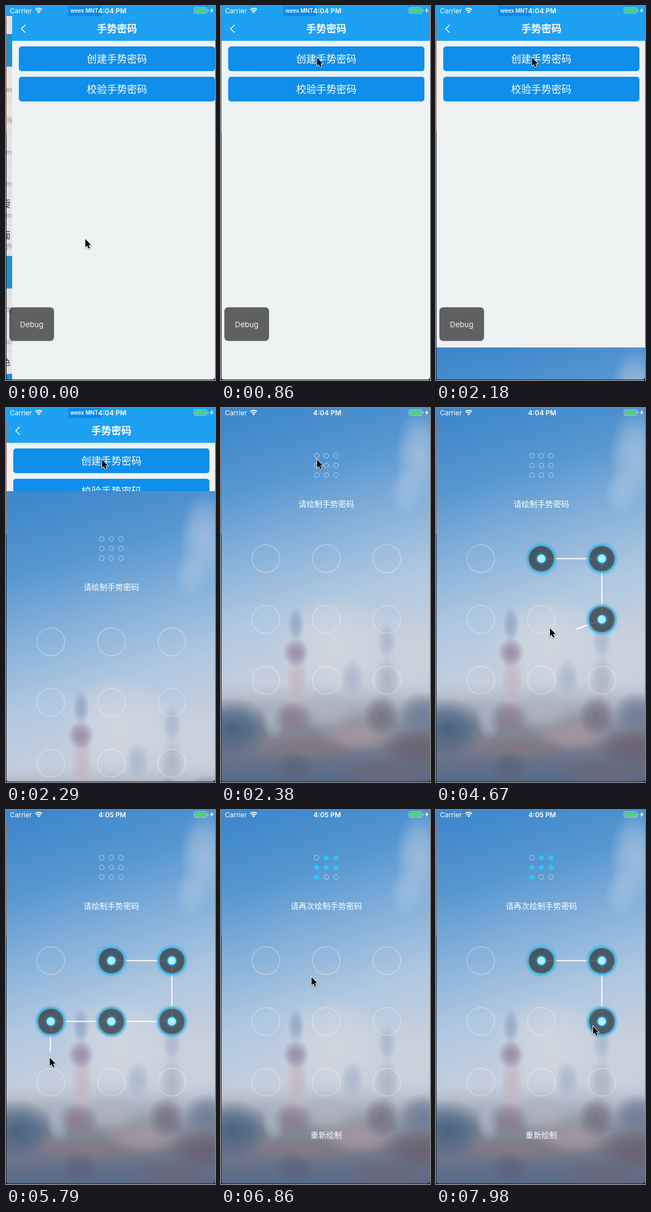
Recreate the animation shown at these times as an HTML page with a canvas. Size 374 px wide and 666 px high, loop 8 s.

```html
<!DOCTYPE html>
<html lang="zh">
<head>
<meta charset="utf-8">
<style>
  html, body { margin: 0; width: 100%; height: 100%; overflow: hidden; background: #000; }
  canvas { display: block; }
</style>
</head>
<body>
<canvas id="stage" width="374" height="666"></canvas>
<script>
const W = 374, H = 666, LOOP = 8000, TOUCH_LAG = 60, HIT_RADIUS = 25;
const FONT = 'Inter, "Noto Sans CJK SC", "Noto Sans CJK", sans-serif';
const ctx = document.getElementById('stage').getContext('2d');

// [time, x, y] of the pointer tip
const pointerKeys = [
  [0, 142, 415], [60, 142, 415], [250, 152, 300], [500, 168, 150], [700, 173, 102], [860, 172, 92],
  [2650, 172, 92], [2800, 171, 160], [2910, 170, 210],
  [3100, 170, 210], [3380, 175, 262],
  [3620, 175, 262], [3800, 215, 265], [4040, 292, 270],
  [4170, 292, 270], [4470, 286, 372], [4610, 252, 394], [4670, 204, 392], [4820, 181, 388],
  [5010, 181, 388], [5450, 83, 382], [5600, 78, 388], [5730, 79, 432], [5850, 78, 450],
  [5910, 80, 468], [6050, 82, 481],
  [6400, 82, 481], [6700, 140, 350], [6970, 177, 262],
  [7270, 177, 262], [7580, 280, 268], [7700, 289, 282], [7920, 286, 379], [7980, 281, 385]
];
const pageKeys = [[0, 10], [60, 10], [180, 0]];
const sheetSteps = [[0, H], [2180, 608], [2230, 340], [2290, 148], [2380, 0]];
const strokes = [[3670, 6350], [7270, LOOP]];
const CONFIRM_AT = 6350, MINUTE_AT = 5450;

const nodes = Array.from({ length: 9 }, (_, i) =>
  [80.2 + (i % 3) * 108.3, 268.3 + Math.floor(i / 3) * 108.2]);

function at(keys, t) {
  const i = keys.findIndex(k => k[0] > t);
  if (i < 0) return keys.at(-1).slice(1);
  const a = keys[i - 1], b = keys[i], f = (t - a[0]) / (b[0] - a[0]);
  return a.slice(1).map((v, n) => v + (b[n + 1] - v) * f);
}

function text(str, x, y, size, color = '#fff', weight = 400, align = 'center') {
  ctx.font = `${weight} ${size}px ${FONT}`;
  ctx.textAlign = align;
  ctx.textBaseline = 'alphabetic';
  ctx.fillStyle = color;
  ctx.fillText(str, x, y);
}

function rect(x, y, w, h, color, radius = 0) {
  ctx.fillStyle = color;
  ctx.beginPath();
  ctx.roundRect(x, y, w, h, radius);
  ctx.fill();
}

function circle(x, y, r, fill, stroke, width = 1) {
  ctx.beginPath();
  ctx.arc(x, y, r, 0, 7);
  if (fill) { ctx.fillStyle = fill; ctx.fill(); }
  if (stroke) { ctx.strokeStyle = stroke; ctx.lineWidth = width; ctx.stroke(); }
}

function line(points, color, width) {
  ctx.beginPath();
  points.forEach(p => ctx.lineTo(...p));
  ctx.strokeStyle = color;
  ctx.lineWidth = width;
  ctx.stroke();
}

// Blurred skyline backdrop, painted once
function makeBackdrop() {
  const canvas = document.createElement('canvas');
  canvas.width = W;
  canvas.height = H;
  const c = canvas.getContext('2d');
  const wash = (x0, y0, x1, y1, stops) => {
    const g = c.createLinearGradient(x0, y0, x1, y1);
    stops.forEach(([pos, color]) => g.addColorStop(pos, color));
    c.fillStyle = g;
    c.fillRect(0, 0, W, H);
  };
  const blob = (x, y, rx, ry, color) => {
    c.save();
    c.translate(x, y);
    c.scale(rx, ry);
    const g = c.createRadialGradient(0, 0, 0, 0, 0, 1);
    g.addColorStop(0, color + 'd0');
    g.addColorStop(.5, color + '90');
    g.addColorStop(1, color + '00');
    c.fillStyle = g;
    c.fillRect(-1, -1, 2, 2);
    c.restore();
  };
  wash(100, 0, 235, 450, [[0, '#3f88cb'], [.25, '#5697d1'], [.5, '#86b1da'], [.75, '#b0c8e0'], [1, '#c6cfdd']]);
  [
    [355, 85, 45, 85, '#a9c2de'], [332, 150, 30, 45, '#9dbfe0'],
    [205, 420, 110, 90, '#d4d8e0'], [330, 440, 80, 70, '#cbd2dd'],
    [297, 415, 17, 35, '#a5b4cb'], [235, 482, 22, 36, '#a4b3c9'], [297, 485, 22, 45, '#abb0be']
  ].forEach(b => blob(...b));
  wash(0, 485, 0, H, [[0, '#b9bfcd00'], [.22, '#a5abbbc0'], [.45, '#848b9c'], [.62, '#817f8d'], [.78, '#697389'], [1, '#566a88']]);
  [
    [134, 385, 15, 32, '#8ba2c0'], [136, 490, 20, 75, '#c3b4c0'], [134, 435, 24, 26, '#90809f'],
    [20, 570, 70, 55, '#3f5c7c'], [95, 553, 24, 38, '#a9b9c8'], [190, 540, 55, 40, '#b3b5c1'],
    [129, 552, 38, 32, '#86788a'], [245, 580, 75, 34, '#a99ba4'], [287, 548, 34, 38, '#716b7d'],
    [360, 545, 45, 40, '#66758f'], [358, 605, 75, 38, '#645c6c'], [150, 606, 90, 22, '#827784'],
    [132, 640, 36, 30, '#5a6279'], [300, 650, 90, 28, '#6b6778']
  ].forEach(b => blob(...b));
  return canvas;
}
const backdrop = makeBackdrop();

function drawPreviousPage() {
  rect(0, 0, W, H, '#e2e3e3');
  rect(0, 0, W, 18, '#1e9ff2');
  [[50, 58], [445, 58], [655, 11]].forEach(([y, h]) => rect(0, y, 12, h, '#1f90d4'));
  [165, 221, 277, 333, 389, 559, 615].forEach(y => rect(0, y, 12, 1, '#cfcfcf'));
  [['ee', 153], ['当', 208], ['m', 265], ['m', 321], ['m', 377], ['件', 433], ['写', 547], ['os', 602]]
    .forEach(([s, y]) => text(s, 0, y, 12, '#999', 400, 'left'));
  [['授', 358], ['面', 414], ['色', 640]].forEach(([s, y]) => text(s, -8, y, 16, '#333', 400, 'left'));
}

function drawPage(t) {
  const [dx] = at(pageKeys, t);
  if (dx > 0) drawPreviousPage();
  ctx.save();
  ctx.translate(dx, 0);
  rect(dx ? 1 : 0, 0, W, H, '#eef2f3');
  rect(dx ? 1 : 0, 0, W, 62, '#1ea0f3');
  line([[24.5, 33.5], [17.5, 40.5], [24.5, 47.5]], '#fff', 1.5);
  text('手势密码', 188.5, 46.5, 18, '#fff', 600);
  ['创建手势密码', '校验手势密码'].forEach((label, i) => {
    rect(13, 72 + i * 54, 351, 44, '#0f8eeb', 5);
    text(label, 188.5, 100.5 + i * 54, 18);
  });
  ctx.restore();
  rect(111, 0, 60, 18, '#0c8ae8');
  text('weex MNT', 115, 12, 9.7, '#fff', 600, 'left');
  rect(6, 536.5, 80, 60, 'rgba(0,0,0,.6)', 7);
  text('Debug', 46, 571.5, 13.5, '#f4f4f4');
}

// Nodes touched so far in the current stroke, plus the finger position
function gesture(t) {
  const stroke = strokes.find(([down, up]) => t >= down && t < up);
  if (!stroke) return { path: [] };
  const path = [1];
  let finger;
  const visit = time => {
    finger = at(pointerKeys, Math.max(0, time - TOUCH_LAG));
    nodes.forEach(([x, y], i) => {
      if (!path.includes(i) && Math.hypot(finger[0] - x, finger[1] - y) < HIT_RADIUS) path.push(i);
    });
  };
  for (let time = stroke[0]; time < t; time += 10) visit(time);
  visit(t);
  return { path, finger };
}

function drawSelected([x, y]) {
  ctx.save();
  circle(x, y, 24.5, 'rgba(56,60,65,.8)');
  ctx.shadowColor = '#17b2f2';
  ctx.shadowBlur = 4;
  circle(x, y, 25, null, '#45bfec', 2.2);
  ctx.shadowBlur = 5;
  circle(x, y, 7.7, '#b9f2ff', '#35b4e6', 1);
  ctx.restore();
  circle(x, y, 23.3, null, 'rgba(205,232,242,.55)', 1);
}

function drawSheet(t) {
  const top = sheetSteps.findLast(s => s[0] <= t)[1];
  if (top >= H) return;
  const confirming = t >= CONFIRM_AT;
  const { path, finger } = gesture(t);
  ctx.save();
  ctx.translate(0, top);
  ctx.drawImage(backdrop, 0, 0);
  nodes.forEach((_, i) => {
    const x = 171.3 + (i % 3) * 17.2, y = 85 + Math.floor(i / 3) * 17.2;
    if (confirming && i > 0 && i < 7) circle(x, y, 4.5, '#2cc6f4');
    else circle(x, y, 4.1, null, 'rgba(225,230,238,.75)', 1);
  });
  text(confirming ? '请再次绘制手势密码' : '请绘制手势密码', 188.5, 176, 14.2);
  if (confirming) text('重新绘制', 188.5, 583.5, 14.1);
  if (path.length) line([...path.map(i => nodes[i]), finger], '#fff', 2);
  nodes.forEach((node, i) => path.includes(i)
    ? drawSelected(node)
    : circle(...node, 24.8, null, 'rgba(255,255,255,.33)', 1.6));
  ctx.restore();
}

function drawStatusBar(t) {
  text('Carrier', 7, 12.7, 12, '#fff', 400, 'left');
  text(t < MINUTE_AT ? '4:04 PM' : '4:05 PM', 190, 12.7, 12.2, '#fff', 600);
  ctx.strokeStyle = '#fff';
  ctx.lineWidth = 2;
  [5.3, 8.7].forEach(r => {
    ctx.beginPath();
    ctx.arc(58.5, 13, r, -2.3, -.84);
    ctx.stroke();
  });
  ctx.fillStyle = '#fff';
  ctx.beginPath();
  ctx.moveTo(58.5, 13.3);
  ctx.arc(58.5, 13, 3, -2.3, -.84);
  ctx.fill();
  ctx.beginPath();
  ctx.roundRect(336.5, 3, 23, 10, 2.5);
  ctx.strokeStyle = 'rgba(255,255,255,.6)';
  ctx.lineWidth = 1;
  ctx.stroke();
  rect(338, 4.5, 20, 7, '#4cd964', 1);
  rect(361, 6.3, 1.4, 3.5, 'rgba(255,255,255,.6)', 1);
  ctx.fillStyle = '#fff';
  ctx.fill(new Path2D('M369.5 3 L365 8.8 H367.8 L366.7 13 L371.3 7.2 H368.5 Z'));
}

function drawWindowEdge() {
  rect(0, 20, 1, 205, '#a8654c');
  rect(0, 225, 1, 441, '#1d2430');
  rect(0, 665, W, 1, '#20242b');
  ctx.fillStyle = '#10141a';
  ctx.fill(new Path2D('M0 661 Q1 665 5 666 H0 Z M374 661 Q373 665 369 666 H374 Z'));
}

const arrow = new Path2D('M0 0 V14.5 L3.3 11.5 L5.6 16.8 L8 15.8 L5.7 10.6 H10.2 Z');
function drawPointer(t) {
  ctx.save();
  ctx.translate(...at(pointerKeys, t));
  ctx.shadowColor = 'rgba(0,0,0,.4)';
  ctx.shadowBlur = 2;
  ctx.shadowOffsetY = 1;
  ctx.strokeStyle = '#fff';
  ctx.lineWidth = 1.8;
  ctx.stroke(arrow);
  ctx.shadowColor = 'transparent';
  ctx.fillStyle = '#000';
  ctx.fill(arrow);
  ctx.restore();
}

function render(now) {
  const t = now % LOOP;
  drawPage(t);
  drawSheet(t);
  drawStatusBar(t);
  drawWindowEdge();
  drawPointer(t);
  requestAnimationFrame(() => render(performance.now()));
}
render(0);
</script>
</body>
</html>
```
